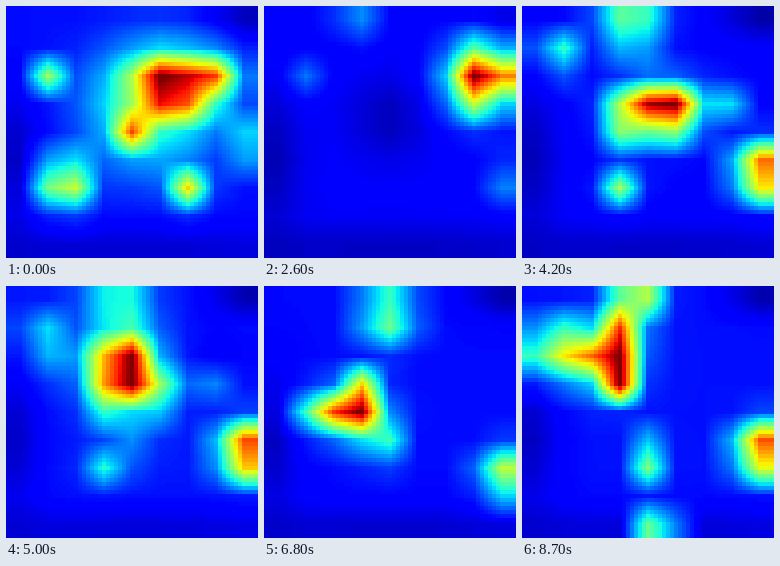
Recreate the animation shown at these times as a matplotlib script. Size 252 by 252 pixels, loop 8.8 s.

```python
import numpy as np
import matplotlib.pyplot as plt
from matplotlib.animation import FuncAnimation

SIZE, CELLS, FINE = 252, 9, 63
FRAMES, STEP = 88, 100
POWER = 3

row, col = np.mgrid[0:CELLS, 0:CELLS]

TIMES = np.array([0, 1200, 2600, 4200, 5800, 6800, 8700])

# Hot spot at each time: column, row, width, height
MAIN = np.array([
    (5.4, 2.4, 1.6, 1.15),
    (8.0, 2.15, 1.0, 1.35),
    (7.1, 2.1, 1.0, 1.2),
    (4.4, 3.2, 1.35, 0.9),
    (3.0, 1.8, 0.75, 1.6),
    (2.6, 4.0, 1.05, 0.75),
    (2.6, 2.0, 0.9, 1.0),
])

# Spot on the right edge
SIDE_ROW = [4.4, 5.8, 5.8, 5.4, 5.4, 6.2, 5.35]
SIDE_HEAT = [0.32, 0.3, 0.26, 0.85, 0.67, 0.52, 0.76]

# Round spots at each time: column, row, radius, strength (negative cools)
SCENES = [
    [(7, 2, 0.85, 0.68), (4, 4, 0.6, 0.68), (1.6, 5.8, 1.05, 0.6),
     (6, 6, 0.8, 0.58), (1.1, 2, 0.7, 0.47), (4.6, 3.2, 2.9, 0.36)],
    [(3.3, 0, 1.1, 0.28), (1.4, 2, 1.2, 0.2), (4.5, 3, 1.5, -0.5)],
    [(8, 2, 0.95, 0.7), (2.8, 0, 1.1, 0.27), (1, 2, 0.9, 0.24),
     (4, 3.5, 1.4, -0.5)],
    [(3, 3.5, 0.7, 0.78), (4.8, 3.3, 0.8, 0.85), (3, 5.9, 0.8, 0.52),
     (3.4, 0.1, 1.4, 0.47), (0.8, 1.2, 0.9, 0.43), (6.6, 3, 0.85, 0.4)],
    [(1.5, 2, 1.2, 0.34), (3.9, 0.8, 1.2, 0.32), (4.1, 5.3, 0.9, 0.33),
     (7, 2, 1.1, -0.5)],
    [(3, 3, 0.6, 0.58), (3.6, 5.2, 0.8, 0.5), (3.9, 0.6, 1.2, 0.47),
     (1.1, 4, 0.8, 0.36)],
    [(3, 1.1, 0.65, 0.7), (3, 3, 0.55, 0.82), (0.8, 1.8, 1.15, 0.58),
     (3.6, 0, 1, 0.55), (4, 5.6, 0.65, 0.61), (4.3, 8, 0.8, 0.46)],
]


def spot(c, r, w, h, a):
    return a * np.exp(-((col - c) / w) ** 2 - ((row - r) / h) ** 2)


def blend(layers):
    return sum(layer ** POWER for layer in layers) ** (1 / POWER)


def backdrop():
    """Even blue that darkens at the left, the bottom and the top right."""
    dark = spot(0, 5, 0.8, 2.4, 0.5) + spot(4, 8, 9, 0.7, 0.4)
    dark += spot(8, 0, 1.2, 0.6, 0.6)
    return 0.13 * (1 - np.clip(dark, 0, 0.75))


def surroundings(spots):
    field = blend([backdrop()] + [spot(c, r, s, s, a)
                                  for c, r, s, a in spots if a > 0])
    for c, r, s, a in spots:
        if a < 0:
            field = field * (1 + spot(c, r, s, s, a))
    return field


def stretch_matrix():
    """Linear weights from cell centres to the fine grid."""
    pos = (np.arange(FINE) + 0.5) * CELLS / FINE - 0.5
    pos = np.clip(pos, 0, CELLS - 1)
    return np.maximum(0, 1 - np.abs(pos[:, None] - np.arange(CELLS)))


FIELDS = np.array([surroundings(s) for s in SCENES])
STRETCH = stretch_matrix()


def heat(i):
    t = i * STEP
    k = min(np.searchsorted(TIMES, t, side="right") - 1, len(TIMES) - 2)
    u = (t - TIMES[k]) / (TIMES[k + 1] - TIMES[k])
    scene = (1 - u) * FIELDS[k] + u * FIELDS[k + 1]
    c, r, w, h = (1 - u) * MAIN[k] + u * MAIN[k + 1]
    side = spot(8, np.interp(t, TIMES, SIDE_ROW), 1, 1.05,
                np.interp(t, TIMES, SIDE_HEAT))
    halo = spot(c, r, 1.9 * w, 1.9 * h, 0.3)
    field = blend([scene, halo, spot(c, r, w, h, 1), side])
    return STRETCH @ (field / field.max()) @ STRETCH.T


fig = plt.figure(figsize=(SIZE / 100, SIZE / 100), dpi=100)
ax = fig.add_axes([0, 0, 1, 1])
ax.axis("off")
image = ax.imshow(heat(0), cmap="jet", vmin=0.02, vmax=0.98,
                  interpolation="nearest", aspect="auto")


def update(i):
    image.set_data(heat(i))
    return [image]


anim = FuncAnimation(fig, update, frames=FRAMES, interval=STEP,
                     repeat=True, repeat_delay=0, blit=False)
plt.show()
```
